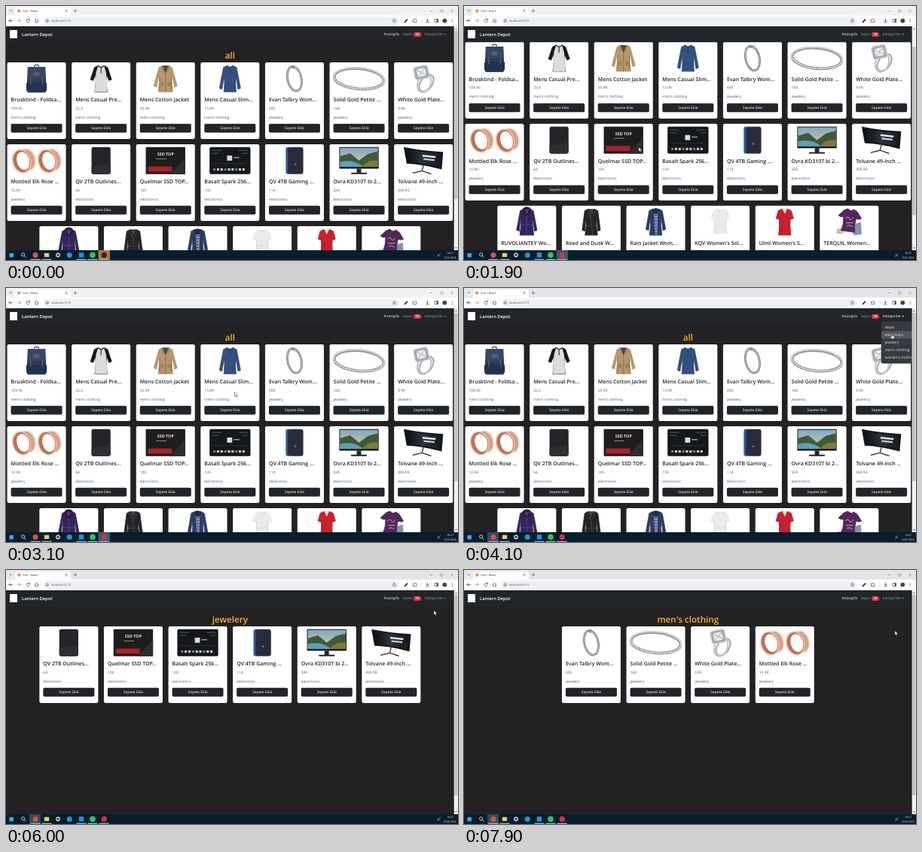
Animation, 600 px wide and 338 px high, one loop 8 s. Source, as an HTML page:

```html
<!DOCTYPE html>
<html lang="tr">
<head>
<meta charset="utf-8">
<title>Vite + React</title>
<style>
  html, body { margin: 0; width: 100%; height: 100%; overflow: hidden; background: #232124; }
  svg { display: block; width: 600px; height: 338px; }
  text { font-family: "Open Sans", "Noto Sans", sans-serif; text-rendering: geometricPrecision; white-space: pre; }
</style>
</head>
<body>
<svg id="stage" viewBox="0 0 600 338" xmlns="http://www.w3.org/2000/svg"></svg>
<script>
const LOOP = 8000, STEP = 100;
const VIEW_W = 594.7, CARD_W = 78, PITCH_X = 85.6, PITCH_Y = 109, TOP = 75;

// --- drawing helpers ---
const rect = (x, y, w, h, fill, r = 0, more = '') =>
  `<rect x="${x}" y="${y}" width="${w}" height="${h}" rx="${r}" fill="${fill}" ${more}/>`;
const path = (d, fill, more = '') => `<path d="${d}" fill="${fill}" ${more}/>`;
const line = (d, color, w = 0.8) => path(d, 'none', `stroke="${color}" stroke-width="${w}" stroke-linecap="round" stroke-linejoin="round"`);
const disc = (x, y, r, fill, more = '') => `<circle cx="${x}" cy="${y}" r="${r}" fill="${fill}" ${more}/>`;
const oval = (x, y, rx, ry, fill, more = '') => `<ellipse cx="${x}" cy="${y}" rx="${rx}" ry="${ry}" fill="${fill}" ${more}/>`;
const ring = (x, y, rx, ry, color, w, turn = 0) =>
  oval(x, y, rx, ry, 'none', `stroke="${color}" stroke-width="${w}" transform="rotate(${turn} ${x} ${y})"`);
const text = (x, y, s, size, fill, more = '') =>
  `<text x="${x}" y="${y}" font-size="${size}" fill="${fill}" ${more}>${s}</text>`;
const group = (s, more = '') => `<g ${more}>${s}</g>`;
const repeat = (n, f) => Array.from({ length: n }, (_, i) => f(i)).join('');
const fade = (id, turn, ...colors) =>
  `<linearGradient id="${id}" gradientTransform="rotate(${turn})">` +
  colors.map((c, i) => `<stop offset="${i / (colors.length - 1)}" stop-color="${c}"/>`).join('') + '</linearGradient>';
const SEMI = 'font-weight="600"', CENTER = 'text-anchor="middle"';

// --- product pictures, centred on 0,0 ---
function garment(fill, sx, sy, w = 8, bottom = 18) {
  const half = [[4, -18], [9, -15.5], [sx, sy], [sx - 3.6, sy + 1.5], [w - 0.5, -6], [w - 1, 4], [w + 0.5, bottom]];
  const left = half.map(([x, y]) => [-x, y]).reverse();
  return path('M' + [...half, ...left].map(p => p.join()).join('L') + 'Q0 -14 4 -18Z', fill,
    `stroke="${fill}" stroke-width=".8" stroke-linejoin="round"`);
}

const art = {
  bag: () => line('M-3 -17Q-3 -19 0 -19Q3 -19 3 -17', '#2b3b55', 1.2) + path('M-12 -16H12L13 4V17Q13 19 11 19H-11Q-13 19 -13 17V4Z', '#2a3c5a') +
    path('M-12 -16H12V0H-12Z', '#33486a') + rect(-14, 5, 28, 12, '#22324d', 2) + rect(-4, -9, 8, 5, '#6b5a50') +
    line('M-8 -1V8M8 -1V8', '#8a7059', 0.9),
  raglan: () => garment('#17181b', 14.5, 1) + path('M-4 -18L-7 -8L-8.5 18H8.5L7 -8L4 -18Q0 -14 -4 -18Z', '#dcdcdf') +
    line('M-4 -18Q0 -13 4 -18M0 -15V-8', '#222', 1.1),
  coat: () => garment('#b5966f', 16, 10, 9.5) + path('M-4 -18L0 -7L4 -18Z', '#4d463e') +
    line('M0 -8V18M-5 -17L-2.5 -10M5 -17L2.5 -10M-8 -3V14M8 -3V14', '#82683f', 0.8) + rect(-7.5, 4, 5, 6, '#a3845a') + rect(2.5, 4, 5, 6, '#a3845a'),
  henley: () => garment('#35507f', 14.5, 13) + line('M-4 -18Q0 -13 4 -18M0 -15V-8M-8 -5L-7 12M8 -5L7 12', '#22365c', 1),
  bracelet: () => ring(0, 0, 9.5, 17, '#77797c', 2.8, -12) + ring(0, 0, 9.5, 17, '#c8cacc', 1, -12) +
    disc(-2, -16, 2.3, '#8d9093') + disc(1.5, -14, 1.6, '#b3b6b9'),
  band: () => ring(0, 0, 34, 14, '#9a9ca1', 4, 5) + ring(0, -0.6, 34.6, 14.4, '#dcdde0', 1.6, 5) +
    repeat(18, i => {
      const a = Math.PI * (0.1 + i * 0.047);
      return disc((34 * Math.cos(a)).toFixed(1), (14 * Math.sin(a) + 3 * Math.cos(a)).toFixed(1), 1.5, '#f4f4f6', 'stroke="#74777d" stroke-width=".6"');
    }),
  gem: () => ring(4, 6, 8, 13, '#a9abb0', 2.2, 35) + ring(1, 6, 9, 13, '#c3c5c9', 2.2, 20) +
    group(rect(-11, -18, 20, 18, '#a8abb1', 4, 'stroke="#d9dbdf" stroke-width="1.6" stroke-dasharray="1.5 1"') + rect(-7, -14.5, 12, 11, '#eceef1', 2) +
      line('M-7 -14L5 -4M5 -14L-7 -4', '#90959c', 0.7), 'transform="rotate(-12)"'),
  pair: () => [-17.5, 17.5].map(x => group(
    oval(3.5, 0, 12, 15.5, '#dca184') + oval(5, 0, 11, 15, 'none', 'stroke="#f6d9c9" stroke-width="1.4"') +
    oval(-3, 0, 12, 16, '#b87355', 'stroke="#efc0a8" stroke-width="1.6"') + oval(-1, 0, 8.5, 12.5, '#fff'),
    `transform="translate(${x} 0) rotate(-16)"`)).join(''),
  drive: () => rect(-13, -18.5, 26, 37, '#242529', 2.5) + path('M-13 8L13 3V16Q13 18.5 10 18.5H-10Q-13 18.5 -13 16Z', '#2d2e33'),
  ssd: () => rect(-27, -18.5, 54, 37, '#1f1c1e', 1) + path('M27 -4V18.5H6Z', '#302b2d') +
    rect(-24, 8, 33, 7, '#a8232c') + text(0, -7, 'SSD TOP', 5.6, '#e6e6e6', `font-weight="700" ${CENTER}`) + rect(-13, -3, 14, 1, '#8e8e90'),
  chip: () => rect(-28, -18.5, 56, 37, '#15171a', 2) + rect(-4, -7, 7, 7, '#d9dcdd') + rect(5, -5, 8, 1.6, '#8f9698') +
    line('M-24 -14H-12M-24 -10H-16M12 -14H24M17 -10H24', '#3f6a70', 0.9) + line('M-24 4H22', '#3d4245', 0.6) +
    repeat(9, i => rect(-23 + i * 5, 10.5, 3.2, 3.2, i % 3 ? '#c9cdce' : '#767d80')),
  game: () => rect(-12, -18.5, 24, 37, 'url(#cool)', 3) + rect(-9, -17.5, 20.5, 35, '#272c38', 2) + disc(1, 5, 1.5, '#5d6a7c'),
  screen: () => rect(-27, -18.5, 54, 29.5, '#17191c', 1) + rect(-26, -17.5, 52, 26, 'url(#sky)') +
    path('M-26 -6L-12 -10L0 0L12 -9L26 -13V8.5H-26Z', '#3f5a38') + path('M-26 2Q-8 -3 6 8.5H-26Z', '#5fa0b5') +
    path('M4 8.5Q12 -2 26 0V8.5Z', '#7d7a3a') + rect(-3, 11, 6, 6, '#24262a') + rect(-11, 16.5, 22, 2, '#24262a', 1),
  wide: () => path('M-27 -18.5Q0 -13 27 -12L25 12Q0 5 -23 4Z', '#15171c') + path('M-25 -16Q0 -11 25 -10L23.5 9Q0 3 -22 2Z', 'url(#night)') +
    group(rect(-2, -8, 18, 2.6, '#dfe3e8') + rect(0, -3.5, 15, 2.4, '#c3c9d0'), 'transform="rotate(6)"') +
    line('M0 6L-2 14M-2 14L-14 17M-2 14L10 18', '#3c3f45', 1.5),
  hood: () => garment('#33245c', 14, 11, 9) + path('M-6 -17Q-5 -21 0 -21Q5 -21 6 -17L3 -9H-3Z', '#281b49') + path('M-3 -17H3L0 -10Z', '#7c2c6c') +
    line('M0 -9V18M-7 4H7', '#57407c', 0.9),
  biker: () => garment('#232427', 12.5, 11) + path('M-4 -18H4L0 -10Z', '#3f4145') + line('M-1 -10L2 18M-7 5H-3M3 5H7M-5 -15L-2 -8M5 -15L2 -8', '#56585d', 0.7),
  rain: () => garment('#2a3d60', 13.5, 10) + path('M-3 -18H3L2 17H-1Z', '#8d97a9') + repeat(8, i => rect(-2, -14 + i * 4, 4, 1.4, '#43557a')) +
    path('M-5 -17Q0 -21 5 -17L2 -11H-2Z', '#1d2c4a'),
  tee: () => garment('#ebebec', 13.5, -5, 9, 16) + line('M-4 -18Q0 -12 4 -18M-8 -5L-7 14M8 -5L7 14M-4 4Q0 7 5 2', '#cfcfd2', 0.8),
  vneck: () => garment('#c6222f', 12, -5) + path('M-3.5 -18.5H3.5L0 -11Z', '#f3dcda') + line('M-7.5 -6L-7 14M7.5 -6L7 14M-3 0L-4 14', '#9d1823', 0.8),
  print: () => path('M2 4L16 0L17 17L6 18Z', '#8493ad') + path('M-17 9H-8V16H-17Z', '#c9bdb5') + group(garment('#52275a', 16, -7, 9, 13), 'transform="rotate(8)"') +
    line('M-5 -5Q-2 -9 0 -5T5 -6M-4 1H5M-3 5Q1 3 4 6', '#d9bccb', 0.9)
};

// --- products: title, price, category, picture ---
const M = "men's clothing", J = 'jewelery', E = 'electronics', W = "women's clothing";
const products = [
  ['Brusktind - Foldsa...', '109.95', M, 'bag'], ['Mens Casual Pre...', '22.3', M, 'raglan'],
  ['Mens Cotton Jacket', '55.99', M, 'coat'], ['Mens Casual Slim...', '15.99', M, 'henley'],
  ['Evan Talbry Wom...', '695', J, 'bracelet'], ['Solid Gold Petite ...', '168', J, 'band'],
  ['White Gold Plate...', '9.99', J, 'gem'], ['Mottled Elk Rose ...', '10.99', J, 'pair'],
  ['QV 2TB Outlines...', '64', E, 'drive'], ['Quelmar SSD TOP...', '109', E, 'ssd'],
  ['Basalt Spark 256...', '109', E, 'chip'], ['QV 4TB Gaming ...', '114', E, 'game'],
  ['Ovra KD310T bi 2...', '599', E, 'screen'], ['Tolvane 49-Inch ...', '999.99', E, 'wide'],
  ['RUVOLIANTEY Wo...', '56.99', W, 'hood'], ['Reed and Dusk W...', '29.95', W, 'biker'],
  ['Rain Jacket Wom...', '39.99', W, 'rain'], ["KQV Women's Sol...", '9.85', W, 'tee'],
  ["Ulmi Women's S...", '7.95', W, 'vneck'], ['TERQUIL Women...', '12.99', W, 'print']
];

const card = ([title, price, kind, pic], x, y) => group(
  rect(0, 0, CARD_W, 102, '#fff', 2.2) +
  group(art[pic](), 'transform="translate(39 21.8) scale(.97)"') +
  text(5, 52.4, title, 7, '#212529', SEMI) + text(5, 62.6, price, 4.9, '#55585c') + text(5, 74.8, kind, 4.9, '#55585c') +
  rect(5, 81.7, 68, 11.8, '#212529', 1.8) + text(39, 89.3, 'Sepete Ekle', 4.9, '#fff', CENTER),
  `transform="translate(${x} ${y})"`);

function shelf(id, items) {
  const rows = [];
  for (let i = 0; i < items.length; i += 7) rows.push(items.slice(i, i + 7));
  return group(rows.map((row, r) => row.map((p, i) => {
    const left = (VIEW_W - row.length * PITCH_X + PITCH_X - CARD_W) / 2;
    return card(p, (left + i * PITCH_X).toFixed(2), TOP + r * PITCH_Y);
  }).join('')).join(''), `id="${id}"`);
}

// --- page, browser frame and taskbar ---
const menuItems = ['Hepsi', E, J, M, W];
const DIM = '#8f9295', INK = '#474a4e';

const page = group(
  rect(0, 27, VIEW_W, 298, '#232124') +
  group(text(VIEW_W / 2, 69.5, '', 11.7, '#f8b425', `id="heading" ${SEMI} ${CENTER}`) +
    shelf('all', products) + shelf(E, products.filter(p => p[2] === E)) + shelf(J, products.filter(p => p[2] === J)), 'id="scroll"') +
  rect(0, 27, VIEW_W, 21.2, '#212529') + rect(5, 32, 10, 11, '#fff') +
  text(21, 40.2, 'Lantern Depot', 5.8, '#fff', SEMI) + text(501.5, 39.4, 'Anasayfa', 4.8, '#fff') +
  text(526.5, 39.4, 'Sepet', 4.8, DIM) + rect(541, 34.8, 10.2, 6.2, '#dc3545', 3.1) +
  text(546.1, 39.4, '15', 4, '#fff', `font-weight="700" ${CENTER}`) +
  group(text(555.5, 39.4, 'Kategoriler', 4.8, 'currentColor') + path('M581.3 36.9H584.1L582.7 38.4Z', 'currentColor'), 'id="toggle"') +
  group(rect(554, 44.5, 60, 55.8, '#343a40', 1.8, 'stroke="#272b30" stroke-width=".4"') +
    rect(554, 57.4, 60, 10, '#52575d', 0, 'id="hover"') +
    menuItems.map((s, i) => text(558.5, 54.2 + i * 10, s, 4.9, '#e4e6e8')).join(''), 'id="menu"'),
  'clip-path="url(#view)"');

const bar = rect(VIEW_W, 27, 5.3, 298, '#f1f1f1') + rect(595.3, 33, 4.1, 224, '#c1c1c1', 0, 'id="thumb"') +
  path('M595.9 31.2H598.9L597.4 29.4ZM595.9 321.2H598.9L597.4 323Z', '#666');

const frame = rect(0, 0, 600, 13, '#f2f1f2', 0, 'id="strip"') + rect(2, 2, 8.5, 8.5, '#e9eaec', 2.5) + line('M5 5.6L6.3 6.9L7.6 5.6', INK) +
  path('M9 13Q12 13 12 10V5Q12 2 15 2H83Q86 2 86 5V10Q86 13 89 13Z', '#fdfdfd') + disc(17.3, 6.5, 2.2, '#e2a52c') +
  text(22.3, 8, 'Vite + React', 3.7, '#33363a') + line('M78.8 5.2L81.4 7.8M81.4 5.2L78.8 7.8M90.2 6.5H93.8M92 4.7V8.3', INK, 0.6) +
  line('M562.5 6.5H566M577 5H580V8H577ZM590.6 5L593.6 8M593.6 5L590.6 8', '#777a7e', 0.5) +
  rect(0, 12.7, 600, 14.3, '#fdfdfd') + rect(50, 14.4, 472, 10.6, '#eef0f3', 5.3) +
  line('M8.5 19.5H4M6 17.5L4 19.5L6 21.5', INK) + line('M15 19.5H19.5M17.5 17.5L19.5 19.5L17.5 21.5', '#a4a7aa') +
  line('M31 18.2A2.2 2.2 0 1 0 31.3 20.4M31.3 17V18.7H29.6M38.2 19.3L40.5 17.2L42.8 19.3M38.9 19V21.8H42.1V19', INK, 0.7) +
  disc(54.7, 19.6, 1.8, 'none', `stroke="${INK}" stroke-width=".6"`) + line('M54.7 19.4V20.5', INK, 0.6) +
  text(60, 21, 'localhost:5173', 3.85, '#505357') +
  line('M515.5 17.2L516.2 18.9L518 19L516.6 20.2L517.1 22L515.5 21L513.9 22L514.4 20.2L513 19L514.8 18.9Z', INK, 0.5) +
  line('M529.5 21.3L532.5 18.2', '#25282c', 1.7) + line('M540.7 18H542.2A.8 .8 0 0 1 543.6 18H544.8V21.6H540.7Z', INK, 0.7) + line('M552 17V22', '#cfd8e8', 0.6) +
  line('M559.5 17V20.2M558 19L559.5 20.4L561 19M557.5 21.8H561.5M569.5 17.5H573.5V21.6H569.5Z', INK, 0.7) +
  rect(571.6, 17.5, 2, 4.1, INK) + disc(582.3, 19.6, 2.9, '#4c4039') +
  [17.7, 19.5, 21.3].map(y => disc(592.3, y, 0.55, INK)).join('');

const run = x => rect(x - 6.5, 336.7, 13, 1.3, '#78b7e0');
const taskbar = rect(0, 325, 600, 13, '#0a1d2d') +
  rect(31, 325, 15, 13, '#34495a', 0, 'id="browserOn"') + rect(122.5, 325, 15.5, 13, '#3a5a70', 0, 'id="recorderOn"') +
  [39, 54, 100, 115, 130].map(run).join('') + rect(4.5, 329, 5.4, 5.4, '#35aee8') +
  disc(22.6, 330.8, 2.1, 'none', 'stroke="#e8edf0" stroke-width=".8"') + line('M24.2 332.5L26 334.5', '#e8edf0') +
  disc(39, 331.4, 3.5, '#e2503f') + rect(50.8, 328.8, 6.4, 5.2, '#f2cb58', 0.6) +
  disc(69, 331.4, 2, 'none', 'stroke="#dfe6ea" stroke-width="1.1"') +
  disc(69, 331.4, 2.9, 'none', 'stroke="#dfe6ea" stroke-width=".8" stroke-dasharray="1.14 1.14"') +
  disc(84.3, 331.4, 3.5, '#2297cf') + rect(96.8, 328.2, 6.4, 6.4, '#2b8fd6') + disc(115, 331.4, 3.8, '#33c45a') +
  disc(130.2, 331.4, 3.6, '#d5333a', 'id="recorder"') +
  line('M572.5 333.3L576.3 329.6M573 330.7L575.4 333', '#cfd7dc', 0.6) +
  text(589.5, 330.4, '18:27', 3.5, '#f0f3f5', CENTER) + text(589.5, 336.2, '8.04.2024', 3.5, '#f0f3f5', CENTER);

const pointer = group(
  path('M0 0V5.6L1.3 4.4L2.2 6.5L3.2 6.1L2.3 4H4.1Z', '#fff', 'id="arrow" stroke="#222" stroke-width=".45"') +
  path('M-.5 .2Q0 -.5 .5 .2V2.7L2.8 3.2Q3.4 3.5 3.2 4.5L2.6 6.6H-.4L-2 4.2Q-1.8 3.4 -.5 4.2Z', '#fff', 'id="hand" stroke="#222" stroke-width=".45"'),
  'id="pointer"');

const $ = id => document.getElementById(id);
$('stage').innerHTML = `<defs><clipPath id="view"><rect y="27" width="${VIEW_W}" height="298"/></clipPath>` +
  fade('cool', 0, '#2a62bd', '#2c3549', '#3b4150') + fade('sky', 90, '#7fa9c9', '#e0c79a') +
  fade('night', 0, '#0b0d13', '#2b3440', '#15171f') +
  '</defs>' + page + bar + frame + taskbar + pointer;

// --- timeline ---
const scrollKeys = [[1750, 0], [1900, 27.3], [1960, 31.25], [2320, 31.25], [2400, 16], [2500, 0]];
const moveKeys = [
  [200, 131, 331], [800, 330, 185], [1200, 404, 137], [1400, 404, 137], [1900, 232, 188], [2400, 123, 206],
  [2800, 150, 195], [3500, 540, 52], [3750, 568, 38], [3900, 568, 40], [4100, 568, 61], [4500, 568, 61],
  [4900, 568, 54], [5200, 568, 38], [5400, 568, 38], [5700, 568, 70], [5850, 568, 70], [6000, 568, 54],
  [6500, 568, 54], [6900, 569, 38], [7100, 569, 38], [7500, 572, 81]
];
const headings = [[0, 'all'], [4500, E], [5900, J], [7850, M]];
const shelves = [[0, 'all'], [4900, E], [6200, J]];
const menuOpen = [[3800, 4500], [5300, 5900], [7000, 7850]];
const FOCUS = 3400, ALERT_END = 400;

const latest = (list, t) => list.filter(k => k[0] <= t).pop()[1];
const ease = p => p * p * (3 - 2 * p);
function at(keys, t, col = 1) {
  const i = keys.findIndex(k => k[0] > t);
  if (i === 0) return keys[0][col];
  if (i < 0) return keys[keys.length - 1][col];
  const a = keys[i - 1], b = keys[i];
  return a[col] + (b[col] - a[col]) * ease((t - a[0]) / (b[0] - a[0]));
}
const show = (id, on) => $(id).setAttribute('display', on ? 'inline' : 'none');

function draw(t) {
  const y = at(scrollKeys, t), mx = at(moveKeys, t, 1), my = at(moveKeys, t, 2);
  const open = menuOpen.some(([a, b]) => t >= a && t < b), shelfNow = latest(shelves, t);
  const item = Math.floor((my - 47.4) / 10), onItem = open && item >= 0 && item < 5;
  const onNav = my > 33 && my < 43 && mx > 554 && mx < 588;
  const focused = t >= FOCUS, alert = t < ALERT_END;

  $('scroll').setAttribute('transform', `translate(0 ${-y})`);
  $('heading').textContent = latest(headings, t);
  ['all', E, J].forEach(id => show(id, id === shelfNow));
  $('thumb').setAttribute('y', 33 + y * 0.78);
  $('thumb').setAttribute('height', shelfNow === 'all' ? 224 : 267);

  show('menu', open);
  show('hover', onItem);
  $('hover').setAttribute('y', 47.4 + item * 10);
  $('toggle').setAttribute('color', open ? '#fff' : onNav ? '#bcbec0' : DIM);

  $('strip').setAttribute('fill', focused ? '#e3e5e9' : '#f2f1f2');
  show('browserOn', focused);
  show('recorderOn', !focused);
  $('recorderOn').setAttribute('fill', alert ? '#b9743c' : '#3a5a70');
  $('recorder').setAttribute('fill', alert ? '#2a2420' : '#d5333a');

  show('pointer', t >= 200);
  show('arrow', !(onItem || onNav));
  show('hand', onItem || onNav);
  $('pointer').setAttribute('transform', `translate(${mx} ${my})`);
}

const start = performance.now();
function tick(now) {
  const t = Math.max(0, now - start) % LOOP;
  draw(Math.floor(t / STEP) * STEP);
  requestAnimationFrame(tick);
}
draw(0);
requestAnimationFrame(tick);
</script>
</body>
</html>
```
